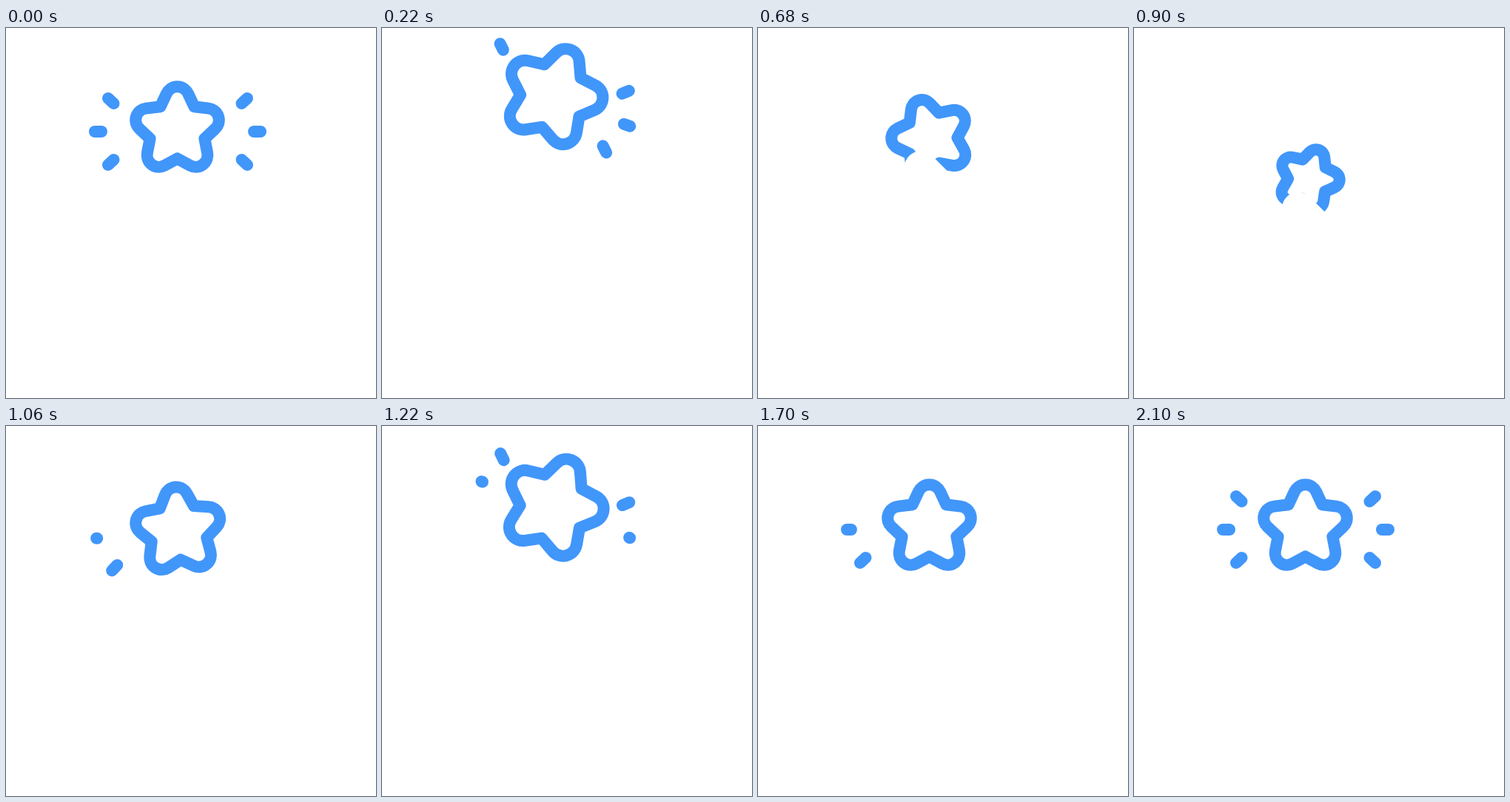
Animation, 500 px wide and 500 px high, one loop 2340 ms. Source, as an HTML page with a canvas:

```html
<!DOCTYPE html>
<html lang="en">
<head>
<meta charset="utf-8">
<title>Tossed star</title>
<style>
html, body { margin: 0; width: 100%; height: 100%; overflow: hidden; background: #fff; }
canvas { display: block; width: 500px; height: 500px; }
</style>
</head>
<body>
<canvas id="stage" width="500" height="500"></canvas>
<script>
const ctx = document.getElementById('stage').getContext('2d');
const LOOP = 2340, STEP = 20, BLUE = '#4196fa';
const clamp = v => Math.max(0, Math.min(1, v));
const ramp = (t, a, b) => clamp((t - a) / (b - a));
const mix = (a, b, u) => a + (b - a) * u;
const smooth = u => u * u * (3 - 2 * u);

// Two tosses: up from rest, down into the hand, up again, back to rest.
const rest = { x: 231.5, y: 137.6, turn: 0, size: 1 };
const high = { x: 231.5, y: 88, turn: 22, size: 1.16 };
const held = { x: 237, y: 229, turn: -72, size: 0.6 };
const again = { x: 231.5, y: 104, turn: 25, size: 1.19 };
const legs = [
  { end: 340, from: rest, to: high, ease: u => 1 - (1 - u) ** 2.4 },
  { end: 850, from: high, to: held, ease: u => smooth(u ** 1.95) },
  { end: 1320, from: held, to: again, ease: u => smooth(u ** 0.56) },
  { end: 1700, from: again, to: rest, ease: u => u ** 1.8 }
];

function poseAt(t) {
  const i = legs.findIndex(leg => t < leg.end);
  if (i < 0) return rest;
  const { end, from, to, ease } = legs[i];
  const u = ease(ramp(t, i ? legs[i - 1].end : 0, end));
  const pose = {};
  for (const key in rest) pose[key] = mix(from[key], to[key], u);
  return pose;
}

function drawStar(size) {
  const at = (r, deg) => {
    const a = deg * Math.PI / 180;
    return [r * size * Math.cos(a), r * size * Math.sin(a)];
  };
  ctx.beginPath();
  ctx.moveTo(...at(38.8, -126));
  for (let a = -90; a < 270; a += 72) {
    const notch = at(38.8, a + 36);
    ctx.arcTo(...at(80, a), ...notch, 16 * size);
    ctx.lineTo(...notch);
  }
  ctx.closePath();
  ctx.stroke();
}

// Six rays, clockwise from the lower left, each running inwards;
// only the part of the whole run between from and to is drawn.
function drawRays(from, to) {
  const ring = 1 - 0.03 * from;
  for (let i = 0; i < 6; i++) {
    const a = clamp(from * 6 - i), b = clamp(to * 6 - i);
    if (b <= a) continue;
    const side = i < 3 ? -1 : 1;
    const row = i < 3 ? 1 - i : i - 4;
    const point = u => [
      ring * (0.5 + side * (112 - 18 * Math.abs(row) - u * (row ? 7.5 : 9))),
      ring * (2.4 + row * (45 - 7 * u))
    ];
    ctx.beginPath();
    ctx.moveTo(...point(a));
    ctx.lineTo(...point(b));
    ctx.stroke();
  }
}

function rayRange(t) {
  if (t < 800) return [ramp(t, 20, 600), 1];
  if (t < 1540) return [ramp(t, 1090, 1520), ramp(t, 1000, 1320)];
  return [0, ramp(t, 1555, 2080)];
}

// White thumb that covers the star while it is held.
function drawThumb(x, y, t) {
  const away = 90 * (1 - ramp(t, 600, 670) + ramp(t, 970, 1040));
  ctx.strokeStyle = '#fff';
  ctx.lineWidth = 44;
  ctx.beginPath();
  ctx.moveTo(x - 14 + away, y + 39.5 + away);
  ctx.lineTo(x + 86 + away, y + 139.5 + away);
  ctx.stroke();
}

function draw(t) {
  const { x, y, turn, size } = poseAt(t);
  ctx.fillStyle = '#fff';
  ctx.fillRect(0, 0, 500, 500);
  ctx.lineCap = ctx.lineJoin = 'round';
  ctx.lineWidth = 16;
  ctx.strokeStyle = BLUE;
  ctx.save();
  ctx.translate(x, y);
  ctx.rotate(turn * Math.PI / 180);
  drawStar(size);
  drawRays(...rayRange(t));
  ctx.restore();
  if (t > 600 && t < 1040) drawThumb(x, y, t);
}

const start = performance.now();
function tick() {
  const t = (performance.now() - start) % LOOP;
  draw(Math.floor(t / STEP) * STEP);
  requestAnimationFrame(tick);
}
tick();
</script>
</body>
</html>
```
